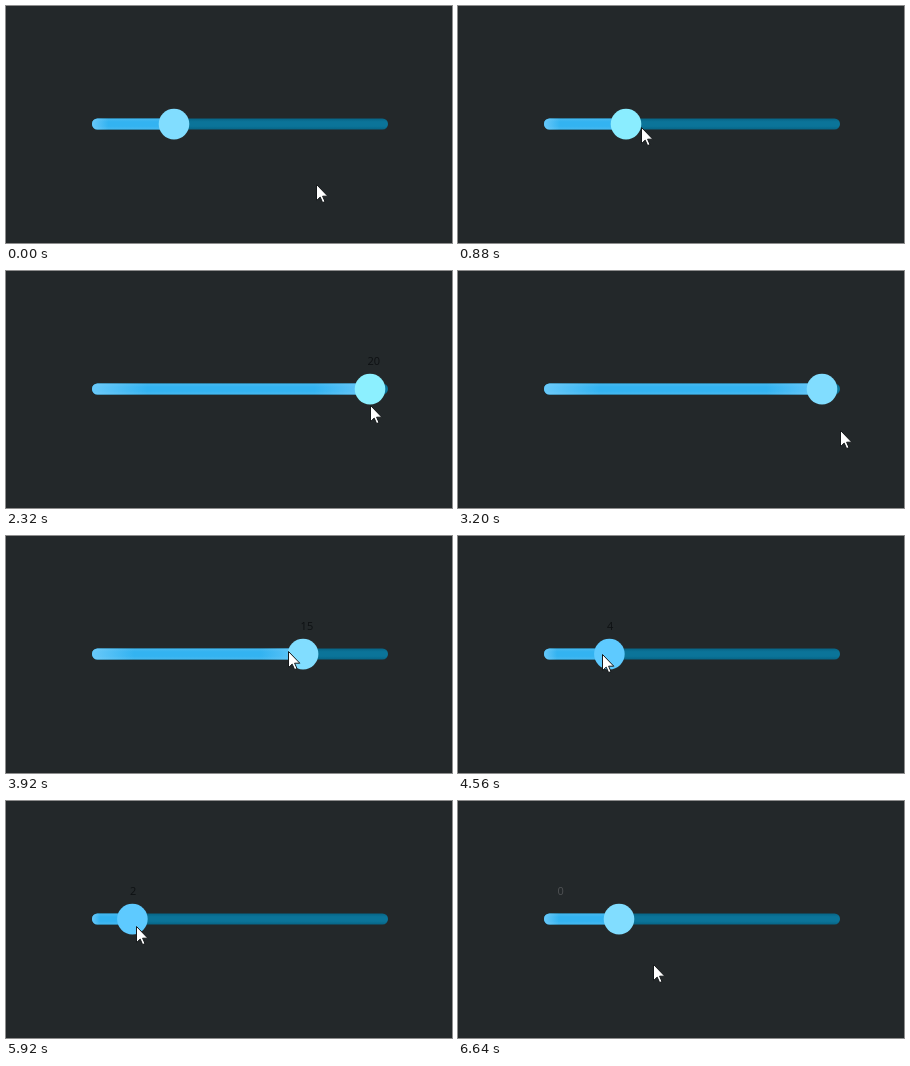
Animation of 446x237 px, one loop 7.6 s. Source, as an HTML page with a canvas:

```html
<!DOCTYPE html>
<html lang="en">
<head>
<meta charset="utf-8">
<title>Slider</title>
<style>
  html, body { margin: 0; width: 100%; height: 100%; overflow: hidden; background: #23282a; }
  canvas { display: block; }
</style>
</head>
<body>
<canvas id="stage" width="446" height="237"></canvas>
<script>
const ctx = document.getElementById('stage').getContext('2d');
const LOOP = 7600, STEP = 80;
const RAIL = { x: 86, y: 112.5, w: 296, h: 11 };
const MIN_X = 102, MAX_X = 364, MAX_VALUE = 20;
const IDLE = [129, 221, 255], HOVER = [140, 240, 255], PRESSED = [94, 202, 255];

const linear = p => p;
const smooth = p => (1 - Math.cos(Math.PI * p)) / 2;
const easeOut = p => Math.sin(Math.PI * p / 2);

// Each move is [begin, end, goal, easing]; the value rests between moves.
function track(value, moves, t) {
  for (const [begin, end, goal, ease = smooth] of moves) {
    if (t <= begin) break;
    const p = ease(Math.min(1, (t - begin) / (end - begin)));
    value = value.map((v, i) => v + (goal[i] - v) * p);
  }
  return value;
}

const thumbAt = t => track([168], [
  [1040, 2270, [MAX_X]],
  [3680, 5140, [MIN_X], easeOut],
  [5600, 6320, [161]]
], t)[0];

const cursorAt = t => track([310, 178], [
  [400, 960, [176, 118]],
  [1000, 2320, [364, 134]],
  [2320, 2720, [376, 134]],
  [2960, 3200, [382, 159]],
  [3200, 3680, [334, 114]],
  [3680, 4560, [144, 118], linear],
  [4560, 5200, [85, 124], easeOut],
  [5200, 5360, [81, 125]],
  [5440, 6320, [166, 125]],
  [6400, 6640, [195, 163]]
], t);

const shadeAt = t => track(IDLE, [
  [640, 960, HOVER],
  [2800, 2880, IDLE],
  [3920, 4240, PRESSED],
  [6400, 6560, IDLE]
], t);

function gradient(x0, y0, x1, y1, stops) {
  const g = ctx.createLinearGradient(x0, y0, x1, y1);
  stops.forEach(([at, colour]) => g.addColorStop(at, colour));
  return g;
}

function bar(width, fill) {
  ctx.fillStyle = fill;
  ctx.beginPath();
  ctx.roundRect(RAIL.x, RAIL.y, width, RAIL.h, Math.min(RAIL.h, width) / 2);
  ctx.fill();
}

const bevel = (edge, core) => gradient(0, RAIL.y, 0, RAIL.y + RAIL.h,
  [[0, edge], [0.3, core], [0.7, core], [1, edge]]);

function drawRail(x) {
  const glow = 'rgba(140,215,255,.6)', clear = 'rgba(140,215,255,0)';
  bar(RAIL.w, bevel('#076485', '#0b7499'));
  bar(x - RAIL.x, bevel('#48b9f0', '#33b3f1'));
  bar(x - RAIL.x, gradient(RAIL.x, 0, x, 0,
    [[0, glow], [0.2, clear], [0.8, clear], [1, glow]]));
}

function drawThumb(x, rgb) {
  ctx.fillStyle = `rgb(${rgb.map(Math.round).join()})`;
  ctx.beginPath();
  ctx.arc(x, 118.1, 15.3, 0, Math.PI * 2);
  ctx.fill();
}

function drawLabel(value, x, colour) {
  ctx.font = '11px "Open Sans", sans-serif';
  ctx.fillStyle = colour;
  ctx.fillText(value, x - 2.5, 93.5);
}

const arrow = new Path2D('M.5 .5V16.6L4.2 13.1L6.6 18.6L9 17.6L6.6 12.2H11.8Z');

function drawCursor(point) {
  ctx.save();
  ctx.translate(...point.map(Math.round));
  ctx.fillStyle = '#fff';
  ctx.strokeStyle = '#15191b';
  ctx.fill(arrow);
  ctx.stroke(arrow);
  ctx.restore();
}

function draw(t) {
  const x = thumbAt(t);
  ctx.fillStyle = '#23282a';
  ctx.fillRect(0, 0, 446, 237);
  drawRail(x);
  drawThumb(x, shadeAt(t));
  const held = (t >= 1120 && t < 3040) || (t >= 3680 && t < 6320);
  const value = Math.round((x - MIN_X) / (MAX_X - MIN_X) * MAX_VALUE);
  if (held) drawLabel(value, x, '#0e1113');
  else if (t >= 6320) drawLabel(0, MIN_X, '#505355');
  drawCursor(cursorAt(t));
}

const start = performance.now();
function tick() {
  const t = (performance.now() - start) % LOOP;
  draw(Math.floor(t / STEP) * STEP);
  requestAnimationFrame(tick);
}
tick();
</script>
</body>
</html>
```
